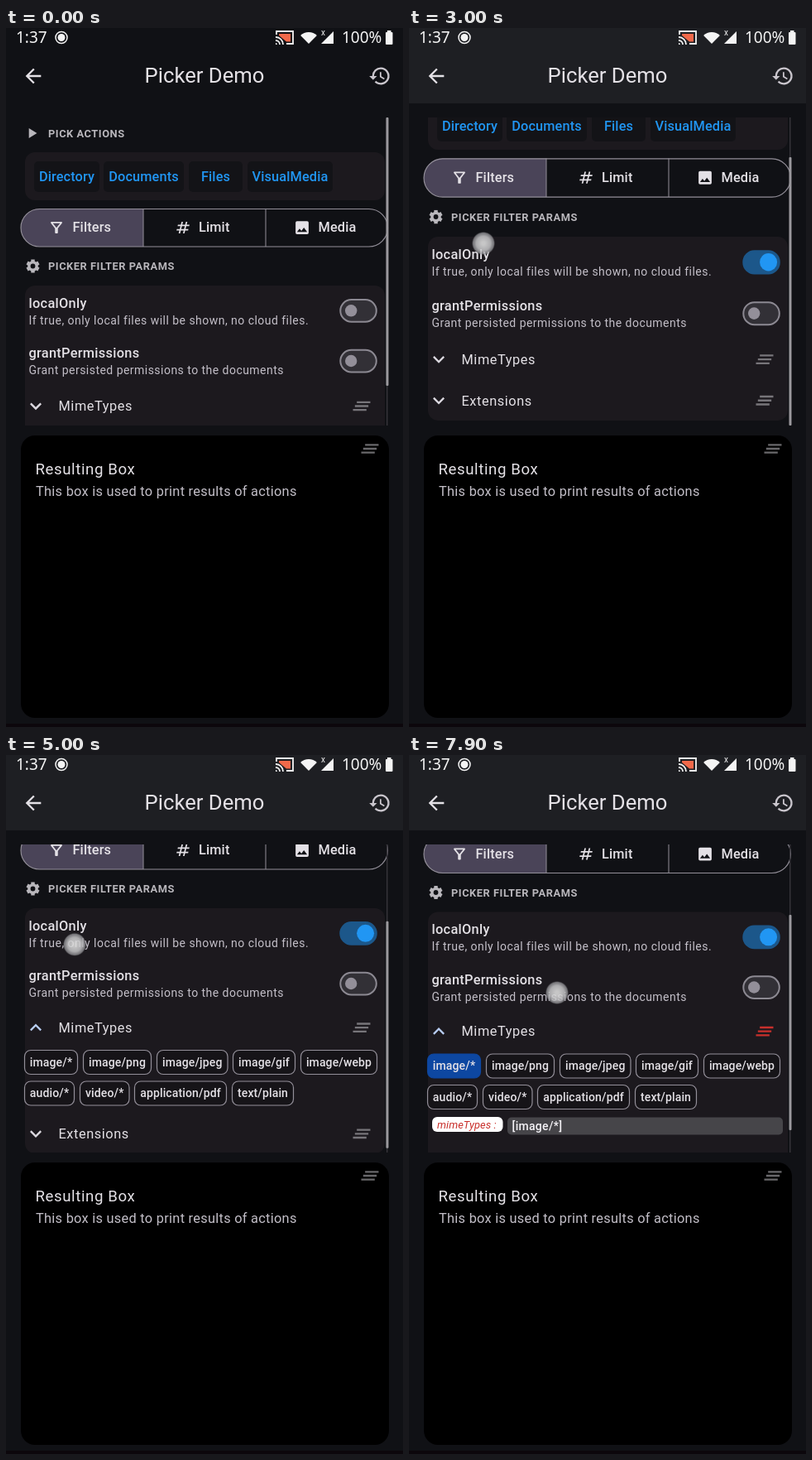
Animation of 480x844 px, one loop 8000 ms. Source, as an HTML page with a canvas:

```html
<!DOCTYPE html>
<html lang="en">
<head>
<meta charset="utf-8">
<title>Picker Demo</title>
<style>
html, body { margin: 0; width: 100%; height: 100%; overflow: hidden; background: #101115; }
canvas { display: block; }
</style>
</head>
<body>
<canvas id="stage" width="480" height="844"></canvas>
<script>
const ctx = document.getElementById('stage').getContext('2d');
const LOOP = 8000, STEP = 100;
const VIEW = { top: 108, bottom: 480, height: 372 };
const C = { bg: '#101115', card: '#1c191e', text: '#e4e1e6', sub: '#c3bfc8', line: '#938f99',
            head: '#b9b7bc', blue: '#2196f3', grey: '#77757a', red: '#c9302c' };

const ICONS = {
  back: 'M20 11H7.83l5.59-5.59L12 4l-8 8 8 8 1.41-1.41L7.83 13H20z',
  history: 'M13 3a9 9 0 0 0-9 9H1l3.89 3.89.07.14L9 12H6a7 7 0 1 1 2.05 4.95l-1.42 1.42A9 9 0 1 0 13 3zm-1 5v5l4.28 2.54.72-1.21-3.5-2.08V8z',
  clear: 'M5 13h14v-2H5zm-2 4h14v-2H3zM7 7v2h14V7z',
  chevron: 'M16.59 8.59 12 13.17 7.41 8.59 6 10l6 6 6-6z',
  filter: 'M7 6h10l-5.01 6.3zm-2.75-.39C6.27 8.2 10 13 10 13v6c0 .55.45 1 1 1h2c.55 0 1-.45 1-1v-6s3.72-4.8 5.74-7.39A1 1 0 0 0 18.95 4H5.04a1 1 0 0 0-.79 1.61z',
  hash: 'M20.5 10 21 8h-4l1-4h-2l-1 4h-4l1-4h-2L9 8H5l-.5 2h4l-1 4h-4L3 16h4l-1 4h2l1-4h4l-1 4h2l1-4h4l.5-2h-4l1-4zm-7 4h-4l1-4h4z',
  image: 'M21 19V5a2 2 0 0 0-2-2H5a2 2 0 0 0-2 2v14a2 2 0 0 0 2 2h14a2 2 0 0 0 2-2zM8.5 13.5l2.5 3.01L14.5 12l4.5 6H5z',
  play: 'M8 6.5v11l9-5.5z'
};
for (const name in ICONS) ICONS[name] = new Path2D(ICONS[name]);

// Keyframes as [time, value] pairs, linear in between.
const TRACKS = {
  scroll: [[2800, 0], [2900, 22], [3000, 55], [4700, 55], [4800, 70], [5000, 126], [5100, 133], [7800, 133], [7900, 121.5]],
  stretch: [[2900, 0], [3000, .018], [3100, .021], [3300, .01], [3600, 0], [5000, 0], [5100, .012], [5200, .014], [5700, 0]],
  bar: [[2800, 0], [3000, 1]],
  local: [[2000, 0], [2300, 1]],
  localInk: [[1900, 0], [2000, .08], [2400, .07], [2700, 0]],
  mimeInk: [[4300, 0], [4400, .08], [4600, .06], [4800, 0]],
  expand: [[4400, 0], [4600, 1]],
  chip: [[6100, 0], [6300, 1]]
};
// Touches: start, end, x, y at start, y at end.
const TOUCHES = [
  [1900, 2100, 100, 343, 343], [2800, 3200, 90, 330, 190], [4300, 4500, 88, 402, 402],
  [4700, 5200, 83, 305, 178], [6000, 6200, 55, 364, 364], [7900, 8000, 179, 287, 287]
];

const mix = (a, b, k) => a + (b - a) * k;
const mixColor = (a, b, k) => `rgb(${a.map((v, i) => Math.round(mix(v, b[i], k)))})`;

function valueAt(keys, t) {
  if (t <= keys[0][0]) return keys[0][1];
  for (let i = 1; i < keys.length; i++) {
    const [t0, a] = keys[i - 1], [t1, b] = keys[i];
    if (t <= t1) return mix(a, b, (t - t0) / (t1 - t0));
  }
  return keys[keys.length - 1][1];
}

// y is the middle of the capital letters.
function text(str, x, y, size, color, { weight = 400, gap = 0, align = 'left', font = 'Roboto', style = 'normal' } = {}) {
  ctx.font = `${style} ${weight} ${size}px ${font}, sans-serif`;
  ctx.letterSpacing = gap + 'px';
  ctx.textAlign = align;
  ctx.fillStyle = color;
  ctx.fillText(str, x, y + size * .355);
}

function box(x, y, w, h, r, fill, stroke, width = 1.2) {
  ctx.beginPath();
  ctx.roundRect(x, y, w, h, r);
  if (fill) { ctx.fillStyle = fill; ctx.fill(); }
  if (stroke) { ctx.strokeStyle = stroke; ctx.lineWidth = width; ctx.stroke(); }
}

function disc(x, y, r, fill) {
  ctx.beginPath();
  ctx.arc(x, y, r, 0, 7);
  ctx.fillStyle = fill;
  ctx.fill();
}

function ring(x, y, r, width, color) {
  ctx.beginPath();
  ctx.arc(x, y, r, 0, 7);
  ctx.lineWidth = width;
  ctx.strokeStyle = color;
  ctx.stroke();
}

function icon(name, x, y, size, color, turn = 0) {
  ctx.save();
  ctx.translate(x, y);
  ctx.rotate(turn);
  ctx.scale(size / 24, size / 24);
  ctx.translate(-12, -12);
  ctx.fillStyle = color;
  ctx.fill(ICONS[name], 'evenodd');
  ctx.restore();
}

function gear(x, y, color) {
  ctx.save();
  ctx.translate(x, y);
  ctx.fillStyle = color;
  for (let i = 0; i < 6; i++) {
    ctx.fillRect(-2.2, -8, 4.4, 4);
    ctx.rotate(Math.PI / 3);
  }
  ring(0, 0, 4.6, 3.4, color);
  ctx.restore();
}

function polygon(points, color) {
  ctx.beginPath();
  points.forEach(([x, y]) => ctx.lineTo(x, y));
  ctx.fillStyle = color;
  ctx.fill();
}

function statusBar() {
  const white = '#f4f4f4', font = { font: 'Noto Sans' };
  text('1:37', 12, 11.5, 19, white, font);
  ring(67, 11.5, 7, 1.5, white);
  disc(67, 11.5, 4.5, white);
  polygon([[330, 7], [344, 7], [344, 16.5], [339, 16.5], [330, 9]], '#f0694a');
  ctx.strokeStyle = white;
  ctx.lineWidth = 1.8;
  ctx.beginPath();
  ctx.moveTo(327, 8); ctx.lineTo(327, 4); ctx.lineTo(347, 4); ctx.lineTo(347, 19); ctx.lineTo(339, 19);
  ctx.stroke();
  for (const r of [1, 5, 9]) {
    ctx.beginPath();
    ctx.arc(326, 20, r, -Math.PI / 2, 0);
    ctx.stroke();
  }
  ctx.beginPath();
  ctx.moveTo(366, 19);
  ctx.arc(366, 19, 14, -Math.PI * .75, -Math.PI * .25);
  ctx.fillStyle = white;
  ctx.fill();
  polygon([[396, 4], [396, 19], [381, 19]], white);
  text('x', 381, 5.5, 10, white);
  text('100%', 406, 11.5, 19, white, font);
  box(459, 5, 8.5, 15, 1, white);
  box(461, 3, 4.5, 3, 0, white);
}

function appBar(k) {
  box(0, 0, 480, 91, 0, mixColor([16, 17, 21], [30, 31, 35], k));
  statusBar();
  icon('back', 33, 58, 28, C.text);
  text('Picker Demo', 240, 57, 25.67, C.text, { align: 'center' });
  icon('history', 452, 58, 28, '#cac6cd');
}

function heading(str, y) {
  text(str, 51, y, 12.83, C.head, { weight: 700, gap: .55 });
}

function actions() {
  icon('play', 32, 127, 26, C.head);
  heading('PICK ACTIONS', 127);
  box(23, 150, 435, 58, 12, C.card);
  [['Directory', 34, 79], ['Documents', 118, 97], ['Files', 221, 65], ['VisualMedia', 292, 103]].forEach(([name, x, w]) => {
    box(x, 161, w, 37, 5, '#131317');
    text(name, x + w / 2, 179.5, 16.33, C.blue, { weight: 500, gap: .12, align: 'center' });
  });
}

function tabs() {
  box(18, 218, 148, 46, [23, 0, 0, 23], '#4a4458');
  box(18, 218.5, 443.5, 45.5, 22.7, null, C.line);
  box(165.5, 218, 1, 46, 0, C.line);
  box(313.5, 218, 1, 46, 0, C.line);
  [['filter', 61, 'Filters', 81], ['hash', 214, 'Limit', 233.5], ['image', 358, 'Media', 378]].forEach(([name, ix, label, x]) => {
    icon(name, ix, 241, 21, C.text);
    text(label, x - .5, 240.6, 16.33, C.text, { weight: 500, gap: .12 });
  });
}

function toggle(y, k) {
  box(404.3, y - 13.2, 43.5, 26.6, 13.3, mixColor([50, 48, 54], [28, 87, 138], k), mixColor([140, 137, 146], [28, 87, 138], k), 2);
  disc(mix(417.2, 434.6, k), y, mix(7.2, 10.5, k), mixColor([147, 143, 153], [33, 150, 243], k));
}

function option(name, note, y, k) {
  text(name, 27.5, y, 16.33, C.text, { weight: 500, gap: .29 });
  text(note, 27.5, y + 20.7, 14, C.sub, { gap: .467 });
  toggle(y + 9.3, k);
}

function tile(name, y, open, iconColor) {
  icon('chevron', 36, y, 28, mixColor([220, 217, 224], [184, 205, 242], open), Math.PI * open);
  text(name, 63.5, y, 16.33, C.text, { gap: .58 });
  icon('clear', 430, y, 28, iconColor);
}

const CHIPS = [
  [['image/*', 22.5, 64], ['image/png', 93.5, 82], ['image/jpeg', 182.5, 85.5], ['image/gif', 274.5, 75], ['image/webp', 356.5, 92]],
  [['audio/*', 22.5, 60], ['video/*', 89.5, 59.5], ['application/pdf', 155.5, 111], ['text/plain', 273.5, 74]]
];

function chips(selected) {
  CHIPS.forEach((row, r) => row.forEach(([name, x, w], i) => {
    const y = 482.5 + r * 37.5, k = r + i ? 0 : selected;
    box(x, y, w, 29, 7.5, mixColor([22, 20, 24], [13, 71, 161], k), mixColor([147, 143, 153], [13, 71, 161], k));
    text(name, x + w / 2, y + 14.5, 14, C.text, { weight: 500, gap: .12, align: 'center' });
  }));
}

function filters(s) {
  const grow = 78 * s.expand + s.extra;
  gear(32.5, 287.5, C.head);
  heading('PICKER FILTER PARAMS', 287.5);
  box(23, 311, 435, 218 + grow, 12, C.card);
  box(23, 311, 435, 60, [12, 12, 0, 0], `rgba(255,255,255,${s.localInk})`);
  box(23, 432, 435, 49, 0, `rgba(255,255,255,${s.mimeInk})`);
  option('localOnly', 'If true, only local files will be shown, no cloud files.', 332, s.local);
  option('grantPermissions', 'Grant persisted permissions to the documents', 392.7, 0);
  tile('MimeTypes', mix(456.5, 455.2, s.expand), s.expand, s.extra ? C.red : C.grey);
  if (s.expand) {
    ctx.save();
    ctx.beginPath();
    ctx.rect(18, 480, 440, grow);
    ctx.clip();
    chips(s.chip);
    if (s.extra) {
      box(28, 558.5, 85.5, 18, 6, '#fff');
      text('mimeTypes :', 34, 567.5, 12.83, C.red, { style: 'italic', gap: .1 });
      box(119, 559, 333, 21, 5, '#464549');
      text('[image/*]', 124.5, 569.5, 14, '#f4f2f6', { weight: 500, gap: .29 });
    }
    ctx.restore();
  }
  tile('Extensions', 505.3 + grow, 0, C.grey);
}

function scrollbar(s) {
  const content = 427 + 78 * s.expand + s.extra, ratio = VIEW.height / content;
  box(460, VIEW.top, 1.5, VIEW.height, 0, '#343338');
  box(459.5, VIEW.top + s.scroll * ratio, 3, VIEW.height * ratio, 1, '#9b999e');
}

function resultBox() {
  box(18, 492, 445, 341, 17, '#000');
  icon('clear', 440, 508, 28, '#69686b');
  text('Resulting Box', 35.5, 532.4, 18.67, C.text, { gap: .58 });
  text('This box is used to print results of actions', 36, 559.5, 16.33, C.sub, { gap: .29 });
}

function touch(t) {
  for (const [start, end, x, y0, y1] of TOUCHES) {
    if (t < start || t >= end) continue;
    const y = mix(y0, y1, (t - start) / (end - start));
    const glow = ctx.createRadialGradient(x, y, 2, x, y, 14);
    glow.addColorStop(0, 'rgba(222,222,222,.88)');
    glow.addColorStop(.55, 'rgba(200,200,202,.84)');
    glow.addColorStop(.88, 'rgba(150,150,154,.72)');
    glow.addColorStop(1, 'rgba(100,100,104,.1)');
    disc(x, y, 14, glow);
  }
}

function draw(t) {
  const s = {};
  for (const name in TRACKS) s[name] = valueAt(TRACKS[name], t);
  s.extra = t >= 6200 ? 27 : 0;

  box(0, 0, 480, 844, 0, C.bg);
  box(0, 840, 480, 4, 0, '#0c070c');
  appBar(s.bar);
  ctx.save();
  ctx.beginPath();
  ctx.rect(0, VIEW.top, 480, VIEW.height);
  ctx.clip();
  ctx.save();
  ctx.translate(0, VIEW.bottom);
  ctx.scale(1, 1 + s.stretch);
  ctx.translate(0, -VIEW.bottom - s.scroll);
  actions();
  tabs();
  filters(s);
  ctx.restore();
  scrollbar(s);
  ctx.restore();
  resultBox();
  touch(t);
}

// The screen updates ten times a second.
function tick() {
  draw(Math.floor(performance.now() % LOOP / STEP) * STEP);
  requestAnimationFrame(tick);
}
tick();
</script>
</body>
</html>
```
